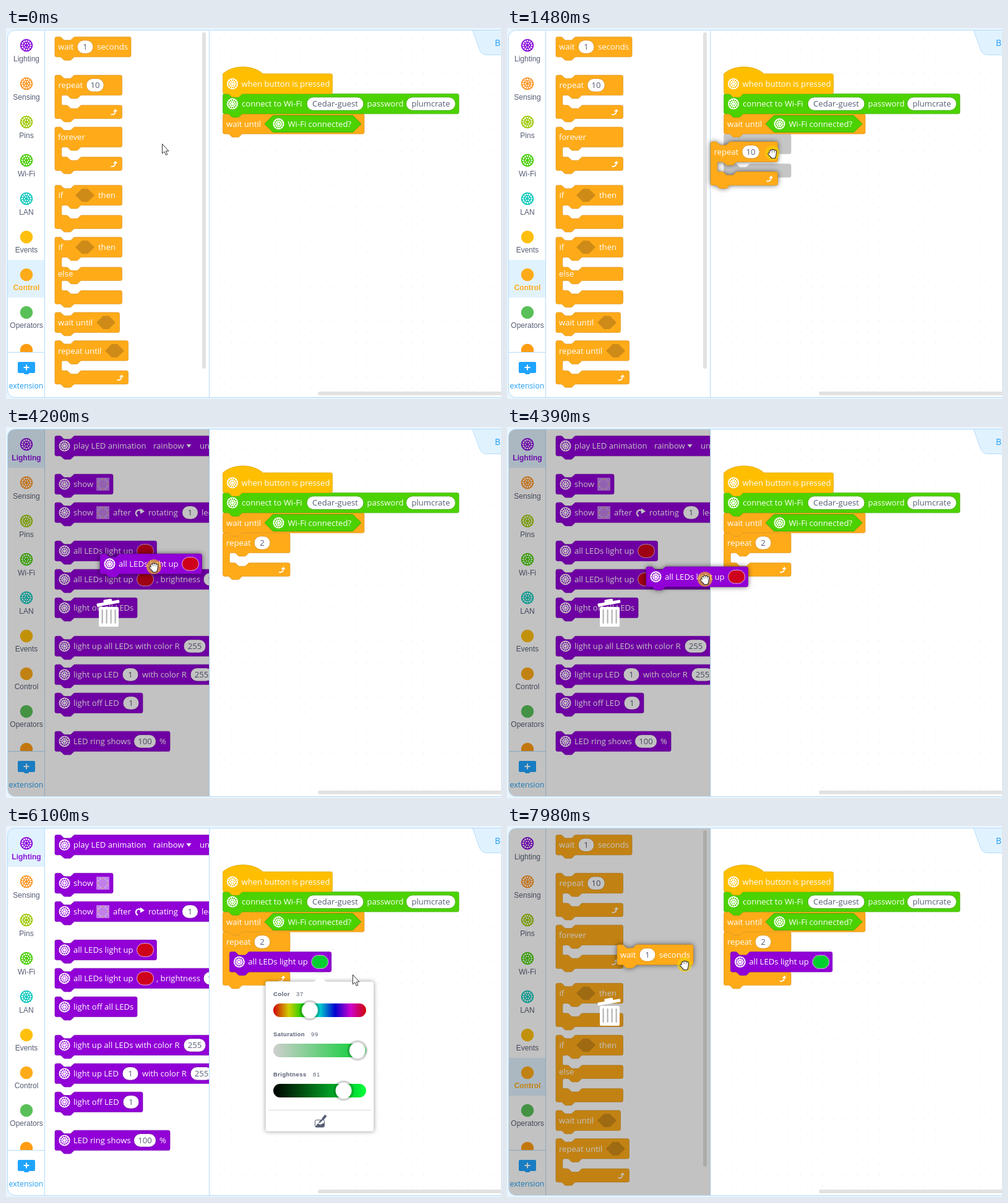
An HTML page with a canvas for the animation above (8 s loop, 800 by 600 pixels).

```html
<!DOCTYPE html>
<html lang="en">
<head>
<meta charset="utf-8">
<title>Block editor</title>
<style>
html, body { margin: 0; width: 100%; height: 100%; overflow: hidden; background: #eaf5fe; }
canvas { display: block; }
</style>
</head>
<body>
<canvas id="stage" width="800" height="600"></canvas>
<script>
const g = document.getElementById('stage').getContext('2d');
const LOOP = 8000, UNIT = 0.675, ROW = 48 * UNIT;
const SANS = '"Open Sans", "Noto Sans", sans-serif', ARIAL = '"Liberation Sans", Arial, sans-serif';
const SLATE = '#575e75', LINE = '#b3dcfb', PALE = '#e1f2ff', BLUE = '#1fa4ff';

const ORANGE = { fill: '#ffab19', edge: '#d9901a', dark: '#cf8b17' };
const YELLOW = { fill: '#ffbf00', edge: '#d9a200' };
const GREEN = { fill: '#4cd200', edge: '#41ab08' };
const PURPLE = { fill: '#9100d6', edge: '#7400ad' };
const GREY = { fill: '#c6c6c6', edge: '#c6c6c6' };

// ---------- time helpers ----------

// Latest value of a [time, value] list.
function at(t, list) {
  let value = list[0][1];
  for (const [from, v] of list) if (t >= from) value = v;
  return value;
}

// Stepped travel; each leg is [start, end, steps, x, y].
function travel(t, x, y, legs) {
  for (const [a, b, n, tx, ty] of legs) {
    if (t < a) break;
    const k = n < 2 || t >= b ? 1 : (Math.floor((t - a) * (n - 1) / (b - a)) + 1) / n;
    x += (tx - x) * k;
    y += (ty - y) * k;
  }
  return [x, y];
}

const within = (t, spans) => spans.some(([a, b]) => t >= a && t < b);

// ---------- drawing helpers ----------

function hsv(h, s, v) {
  const f = n => {
    const k = (n + h / 60) % 6;
    return Math.round(255 * (v - v * s * Math.max(0, Math.min(k, 4 - k, 1))));
  };
  return `rgb(${f(5)},${f(3)},${f(1)})`;
}

function disc(x, y, r, fill) {
  g.fillStyle = fill;
  g.beginPath();
  g.arc(x, y, r, 0, 7);
  g.fill();
}

function box(x, y, w, h, r, fill, stroke) {
  g.beginPath();
  g.roundRect(x, y, w, h, r);
  if (fill) { g.fillStyle = fill; g.fill(); }
  if (stroke) { g.strokeStyle = stroke; g.lineWidth = 1; g.stroke(); }
}

function poly(points, fill, stroke) {
  g.beginPath();
  points.forEach(([x, y]) => g.lineTo(x, y));
  g.closePath();
  if (fill) { g.fillStyle = fill; g.fill(); }
  if (stroke) { g.strokeStyle = stroke; g.lineWidth = 1; g.stroke(); }
}

function line(x1, y1, x2, y2, color, width = 1) {
  g.strokeStyle = color;
  g.lineWidth = width;
  g.beginPath();
  g.moveTo(x1, y1);
  g.lineTo(x2, y2);
  g.stroke();
}

function write(text, x, y, font, color, align = 'left', spacing = 0) {
  g.font = font;
  g.fillStyle = color;
  g.textAlign = align;
  g.letterSpacing = spacing + 'px';
  g.fillText(text, x, y);
  g.letterSpacing = '0px';
}

function shadowed(blur, alpha, draw) {
  g.save();
  g.shadowColor = `rgba(0,0,0,${alpha})`;
  g.shadowBlur = blur;
  draw();
  g.restore();
}

// LED ring pictogram
function ring(x, y, r, base, dots) {
  disc(x, y, r, base);
  for (let i = 0; i < 12; i++) {
    const a = i * Math.PI / 6;
    disc(x + Math.cos(a) * r * .68, y + Math.sin(a) * r * .68, r * .13, dots);
  }
  for (let i = 0; i < 6; i++) {
    const a = i * Math.PI / 3;
    disc(x + Math.cos(a) * r * .32, y + Math.sin(a) * r * .32, r * .1, dots);
  }
}

// ---------- block parts: each is drawn at (x, y) of its row centre ----------

const label = (text, dx) => (x, y) => write(text, x + dx, y + 4.6, '13.1px ' + SANS, '#fff');

const oval = (text, cx, w) => (x, y, c) => {
  box(x + cx - w / 2, y - 10.8, w, 21.6, 10.8, '#fff', c.edge);
  write(text, x + cx, y + 4.6, '13.1px ' + SANS, SLATE, 'center');
};

const swatch = (color, cx) => (x, y) => box(x + cx - 13.5, y - 10.8, 27, 21.6, 10.8, color, '#dfb0ee');

function hexagon(cx, y, w, h, fill, edge) {
  const l = cx - w / 2, r = cx + w / 2, k = h / 2;
  poly([[l, y], [l + k, y - k], [r - k, y - k], [r, y], [r - k, y + k], [l + k, y + k]], fill, edge);
}

const slot = cx => (x, y, c) => hexagon(x + cx, y, 31, 21.6, c.dark);
const emblem = (cx = 15.5) => (x, y, c) => ring(x + cx, y, 9, '#fff', c.fill);

const panel = cx => (x, y) => {
  const l = x + cx - 10.5, t = y - 10.5;
  box(l, t, 21, 21, 1, '#c080e8');
  for (let i = 0; i < 12; i++) {
    const a = i * Math.PI / 6;
    g.fillStyle = i % 3 ? '#dcc0ee' : '#e8a860';
    g.fillRect(x + cx - 1 + Math.cos(a) * 8, y - 1 + Math.sin(a) * 8, 2, 2);
  }
};

const turn = cx => (x, y) => {
  g.strokeStyle = '#fff';
  g.lineWidth = 2.4;
  g.beginPath();
  g.arc(x + cx - 1, y + 1, 5, 2, 5.4);
  g.stroke();
  poly([[x + cx + 1, y - 7], [x + cx + 8, y - 2], [x + cx + 1, y + 2]], '#fff');
};

const caret = cx => (x, y) => poly([[x + cx - 4, y - 2.5], [x + cx + 4, y - 2.5], [x + cx, y + 3]], '#fff');

const condition = (x, y) => {
  hexagon(x + 145.5, y, 156, 27, GREEN.fill, GREEN.edge);
  emblem(90)(x, y, GREEN);
  label('Wi-Fi connected?', 105)(x, y);
};

// ---------- block outline ----------

const DIP = 'c2 0 3 1 4 2l4 4c1 1 2 2 4 2h12c2 0 3-1 4-2l4-4c1-1 2-2 4-2';
const BUMP = 'c-2 0-3 1-4 2l-4 4c-1 1-2 2-4 2h-12c-2 0-3-1-4-2l-4-4c-1-1-2-2-4-2';

// rows: first arm, then mouth and arm pairs, in units
function outline(w, rows, hat) {
  const right = `H${w - 4}a4 4 0 0 1 4 4`;
  let d = (hat ? 'M0 0c25-22 71-22 96 0' : 'M0 4a4 4 0 0 1 4-4h8' + DIP) + right;
  let y = rows[0];
  for (let i = 1; i < rows.length; i += 2) {
    d += `V${y - 4}a4 4 0 0 1-4 4H64${BUMP}h-8a4 4 0 0 0-4 4V${y + rows[i] - 4}a4 4 0 0 0 4 4h8${DIP}${right}`;
    y += rows[i] + rows[i + 1];
  }
  return new Path2D(d + `V${y - 4}a4 4 0 0 1-4 4H48${BUMP}H4a4 4 0 0 1-4-4z`);
}

function loopArrow(x, y) {
  g.strokeStyle = '#fff';
  g.lineWidth = 1.8;
  g.beginPath();
  g.moveTo(x - 5, y + 4);
  g.quadraticCurveTo(x + 2, y + 4.5, x + 2, y - 1);
  g.stroke();
  poly([[x - 1.5, y - 1], [x + 2.5, y - 5], [x + 5.5, y - 1]], '#fff');
}

function drawBlock(b, x, y, { lifted = false, marker = false } = {}) {
  const c = marker ? GREY : b.color, rows = b.rows || [48];
  const paint = () => {
    g.save();
    g.translate(x, y);
    g.scale(UNIT, UNIT);
    const path = outline(b.w / UNIT, rows, b.hat);
    g.fillStyle = c.fill;
    g.fill(path);
    g.shadowColor = 'transparent';
    g.strokeStyle = c.edge;
    g.lineWidth = 1;
    g.stroke(path);
    g.restore();
  };
  if (lifted) shadowed(9, .6, paint); else paint();
  if (marker) return;
  b.parts.forEach(part => part(x, y + ROW / 2, c));
  const total = rows.reduce((a, h) => a + h, 0) * UNIT;
  if (b.loop) loopArrow(x + b.w - 13, y + total - 10.5);
  if (b.other) label('else', 5)(x, y + 88 * UNIT);
}

// ---------- block definitions ----------

const control = (w, parts, extra) => ({ color: ORANGE, w, parts, ...extra });
const light = (w, ...parts) => ({ color: PURPLE, w, parts: [emblem(), ...parts] });
const mouth = (inner = 24) => [48, inner, 32];

const waitBlock = control(123, [label('wait', 5), oval('1', 49, 26), label('seconds', 68)]);
const repeatBlock = (n, inner) => control(108.5,
  [label('repeat', 5.5), oval(n, n === '2' ? 63.5 : 65, n === '2' ? 26 : 28.5)], { rows: mouth(inner), loop: true });
const lightUp = color => light(164.5, label('all LEDs light up', 30), swatch(color, 146));
const RED = hsv(352.8, .99, .81);

const controlBlocks = [
  [14.4, waitBlock],
  [76.3, repeatBlock('10')],
  [160.2, control(108.5, [label('forever', 5)], { rows: mouth(), loop: true })],
  [254.3, control(108.5, [label('if', 5.5), slot(48.5), label('then', 70)], { rows: mouth() })],
  [338.3, control(108.5, [label('if', 5.5), slot(48.5), label('then', 70)], { rows: [48, 24, 32, 24, 32], other: true })],
  [460, control(104.5, [label('wait until', 5), slot(82.5)])],
  [505.7, control(118.5, [label('repeat until', 5), slot(96.5)], { rows: mouth(), loop: true })]
];

const lightBlocks = [
  [14.4, light(306, label('play LED animation', 30), label('rainbow', 159), caret(216.5), label('until done', 234))],
  [76.3, light(94, label('show', 30), panel(77.5))],
  [122.2, light(290, label('show', 30), panel(77.5), label('after', 94), turn(137), label('rotating', 151), oval('1', 218.5, 26), label('leds', 237))],
  [184.3, lightUp(RED)],
  [230.2, light(300, label('all LEDs light up', 30), swatch(RED, 146), label(', brightness', 164), oval('100', 258, 36))],
  [276.2, light(133, label('light off all LEDs', 30))],
  [338.3, light(360, label('light up all LEDs with color R', 30), oval('255', 226, 36))],
  [384.2, light(360, label('light up LED', 30), oval('1', 122, 26), label('with color R', 141), oval('255', 237, 36))],
  [430.2, light(142, label('light off LED', 30), oval('1', 123, 26))],
  [492.2, light(186, label('LED ring shows', 30), oval('100', 145.5, 36), label('%', 169))]
];

const stackBlocks = [
  { color: YELLOW, w: 177, hat: true, parts: [emblem(), label('when button is pressed', 30)] },
  { color: GREEN, w: 381.5, parts: [emblem(), label('connect to Wi-Fi', 30.5), oval('Cedar-guest', 181.5, 92), label('password', 233), oval('plumcrate', 336, 80)] },
  control(228.5, [label('wait until', 5.5), condition])
];

// ---------- page regions ----------

const categories = [
  ['Lighting', '#8c14dc', 28], ['Sensing', '#ff9a2e', 90], ['Pins', '#a2cb10', 152],
  ['Wi-Fi', '#4bcf0a', 214], ['LAN', '#18cabe', 276], ['Events', '#ffbf0d', 338],
  ['Control', '#ffab19', 399], ['Operators', '#59c059', 460], ['', '#ff9c12', 521]
];

function sidebar(active) {
  g.fillStyle = '#fff';
  g.fillRect(3, 4, 325, 594);
  categories.forEach(([name, color, y], i) => {
    const on = name === active;
    if (on) {
      g.fillStyle = PALE;
      g.fillRect(3, y - 24, 59, i < 5 ? 62 : 61);
    }
    if (i < 5) ring(33, y, 10.3, color, '#fff'); else disc(33, y, 10.3, color);
    write(name, 33, y + (i < 5 ? 25.5 : 25), (on ? 'bold ' : '') + '12px ' + ARIAL, on ? color : SLATE, 'center');
  });
  g.fillStyle = '#fff';
  g.fillRect(3, 524, 59, 74);
  line(3, 524.5, 62, 524.5, LINE);
  box(19, 540, 28, 18, 2, BLUE);
  poly([[28, 557], [38, 557], [36, 560], [30, 560]], BLUE);
  line(28.5, 549, 37.5, 549, '#fff', 2);
  line(33, 544.5, 33, 553.5, '#fff', 2);
  write('extension', 32.5, 583, '12.3px ' + SANS, '#1f9df2', 'center');
}

function workspace() {
  g.fillStyle = '#fff';
  g.fillRect(328, 4, 472, 594);
  g.fillStyle = '#dcdcdc';
  for (let x = 346; x < 800; x += 18.22)
    for (let y = 17; y < 598; y += 18.22) g.fillRect(Math.round(x), Math.round(y), 1, 1);
  g.beginPath();
  g.moveTo(754, 3.5);
  g.lineTo(765, 34);
  g.quadraticCurveTo(768, 43.5, 777, 43.5);
  g.lineTo(801, 43.5);
  g.lineTo(801, 3.5);
  g.fillStyle = PALE;
  g.fill();
  g.strokeStyle = LINE;
  g.lineWidth = 1;
  g.stroke();
  write('B', 790, 28.5, '14px ' + SANS, '#1f9df2');
  box(504, 588, 310, 6, 3, '#e2e2e2');
}

function flyout(blocks) {
  g.save();
  g.beginPath();
  g.rect(63, 4, 265, 594);
  g.clip();
  blocks.forEach(([y, b]) => drawBlock(b, 79, y));
  g.restore();
  if (blocks === controlBlocks) box(317, 7, 6, 544, 3, '#e2e2e2');
}

function trash() {
  box(150, 291, 32, 32, 2, '#fff');
  for (let i = 0; i < 4; i++) box(154.5 + i * 7, 295, 2.2, 23, 1, '#b4b4b4');
  g.save();
  g.translate(165, 285);
  g.rotate(-.17);
  box(-18.5, -2.5, 37, 5, 1, '#fff');
  box(-7, -6.5, 14, 5, 2, '#fff');
  g.restore();
}

function slider(name, value, y, color) {
  write(name, 432, y - 23, 'bold 9.5px ' + ARIAL, SLATE, 'left', .4);
  const gap = name === 'Color' ? 37 : name === 'Saturation' ? 61 : 64;
  write(value, 432 + gap, y - 23, '9.5px ' + ARIAL, SLATE, 'left', .6);
  const fill = g.createLinearGradient(432, 0, 582, 0);
  for (let i = 0; i <= 30; i++) fill.addColorStop(i / 30, color(i / 30));
  box(432, y - 11, 150, 22, 11, fill);
  const x = 445 + 1.242 * value;
  disc(x, y, 16.5, 'rgba(0,0,0,.17)');
  disc(x, y, 13, '#fff');
}

function picker(hue) {
  const deg = hue * 3.6;
  shadowed(7, .4, () => box(419.5, 251.5, 175, 242.5, 3, '#fff'));
  box(419.5, 251.5, 175, 242.5, 3, '#fff', '#dcdcdc');
  poly([[497, 252.5], [507.5, 242], [518, 252.5]], '#fff');
  slider('Color', hue, 298, k => hsv(k * 360, .99, .81));
  slider('Saturation', 99, 363, k => hsv(deg, k, .81));
  slider('Brightness', 81, 428, k => hsv(deg, .99, k));
  line(424, 459.5, 590, 459.5, '#d9d9d9');
  box(499.5, 475.5, 15, 11.5, 2, null, SLATE);
  poly([[500, 486], [504, 481], [508, 483], [514, 480], [514, 487], [500, 487]], SLATE);
  line(506, 480, 514, 472, SLATE, 2.4);
  line(512, 474, 517, 468, SLATE, 4);
}

// ---------- pointer ----------

const SHAPES = {
  open: [[-3, 1, -5, -5], [-.5, 0, -1.5, -7.5], [2, 0, 2.5, -7], [4.5, 1, 6, -4.5], [-3, 4, -7, .5]],
  closed: [[-3, 1, -3.5, -2.5], [-.5, 0, -.7, -4], [2, 0, 2.2, -3.8], [4.5, 1, 5, -2.5], [-3, 4, -5.5, 1.5]]
};

function pointer(x, y, kind) {
  g.save();
  g.translate(x, y);
  if (kind === 'arrow') {
    poly([[.5, .5], [.5, 16], [4, 12.8], [6.4, 18.5], [8.8, 17.5], [6.5, 12], [11, 12]], '#fff', '#333');
  } else {
    g.lineCap = 'round';
    for (const [color, grow] of [['#222', 2], ['#fff', 0]]) {
      for (const f of SHAPES[kind]) line(...f, color, 2.3 + grow);
      line(-.5, 3, 2, 3, color, 7 + grow);
      line(0, 6, 2.5, 6, color, 4.5 + grow);
    }
  }
  g.restore();
}

const POINTER_LEGS = [
  [80, 360, 4, 175, 83], [530, 530, 1, 171, 86],
  [830, 1480, 8, 429, 202], [1590, 1590, 1, 433, 204], [1780, 1950, 3, 414, 190],
  [2230, 2610, 5, 34, 36], [2790, 2890, 2, 230, 170], [3080, 3160, 2, 357, 237], [3270, 3270, 1, 301, 224],
  [3550, 3835, 4, 158, 206], [4100, 4390, 4, 320, 246], [4480, 4770, 4, 440, 236],
  [4960, 5230, 4, 507, 222], [5430, 5620, 3, 491, 298], [6010, 6100, 2, 560, 240],
  [6570, 6750, 3, 34, 402], [6940, 7030, 2, 186, 48], [7310, 7310, 1, 172, 33],
  [7700, 7700, 1, 189, 67], [7790, 7980, 3, 287, 224]
];
const POINTER_KINDS = [
  [0, 'arrow'], [360, 'open'], [640, 'arrow'], [925, 'closed'], [1590, 'open'], [1950, 'arrow'],
  [3160, 'open'], [3270, 'arrow'], [3835, 'open'], [4100, 'arrow'], [4200, 'closed'], [4870, 'open'],
  [5140, 'arrow'], [7310, 'open'], [7700, 'arrow'], [7790, 'closed']
];
const PRESSES = [
  [530, 1590], [1950, 2140], [2700, 2790], [3930, 4870], [5330, 5430], [5710, 5910], [6840, 6940], [7510, LOOP]
];

// ---------- drags ----------

const DRAGS = [
  { from: 830, to: 1590, block: repeatBlock('10'), x: 79, y: 76, legs: [[830, 1480, 8, 329, 184]] },
  { from: 4100, to: 4870, block: lightUp(RED), x: 79, y: 184.3, legs: [[4100, 4390, 4, 225, 226], [4480, 4770, 4, 353, 213]] },
  { from: 7700, to: LOOP, block: waitBlock, x: 79, y: 14.4, legs: [[7700, 7700, 1, 78, 28], [7790, 7980, 3, 178, 192]] }
];

function stack(t, color) {
  const x = 350.5;
  const top = i => 74 + i * ROW;
  if (t >= 1590) drawBlock(repeatBlock(t < 2140 ? '10' : '2', t >= 4580 ? 48 : 24), x, top(3));
  else if (t >= 1300) drawBlock(repeatBlock('10'), x, top(3), { marker: true });
  for (let i = 2; i >= 0; i--) drawBlock(stackBlocks[i], x, top(i));
  if (t >= 4580) drawBlock(lightUp(color), x + 16 * UNIT, top(4), { marker: t < 4870 });
}

function render(t) {
  const hue = at(t, [[0, 98], [5820, 45], [5910, 37]]);
  const active = t >= 2700 && t < 6840 ? 'Lighting' : 'Control';
  const [px, py] = travel(t, 252, 187, POINTER_LEGS);
  const drag = DRAGS.find(d => t >= d.from && t < d.to);

  g.fillStyle = '#eaf5fe';
  g.fillRect(0, 0, 800, 600);
  g.save();
  g.beginPath();
  g.roundRect(2.5, 3.5, 820, 594, 12);
  g.clip();
  workspace();
  sidebar(active);
  flyout(active === 'Control' ? controlBlocks : lightBlocks);
  line(62.5, 4, 62.5, 598, LINE);
  line(328.5, 4, 328.5, 598, LINE);
  stack(t, hsv(hue * 3.6, .99, .81));
  if (drag && t >= drag.from + 90 && px < 328) {
    g.fillStyle = 'rgba(0,0,0,.24)';
    g.fillRect(3, 4, 325.5, 594);
    trash();
  }
  g.restore();
  box(2.5, 3.5, 820, 594, 12, null, LINE);

  if (t >= 5330 && t < 6840) picker(hue);
  if (drag) drawBlock(drag.block, ...travel(t, drag.x, drag.y, drag.legs), { lifted: true });
  if (within(t, PRESSES)) disc(px, py, 12, 'rgba(245,212,0,.6)');
  pointer(px, py, at(t, POINTER_KINDS));
}

function tick() {
  render(performance.now() % LOOP);
  requestAnimationFrame(tick);
}
tick();
</script>
</body>
</html>
```
